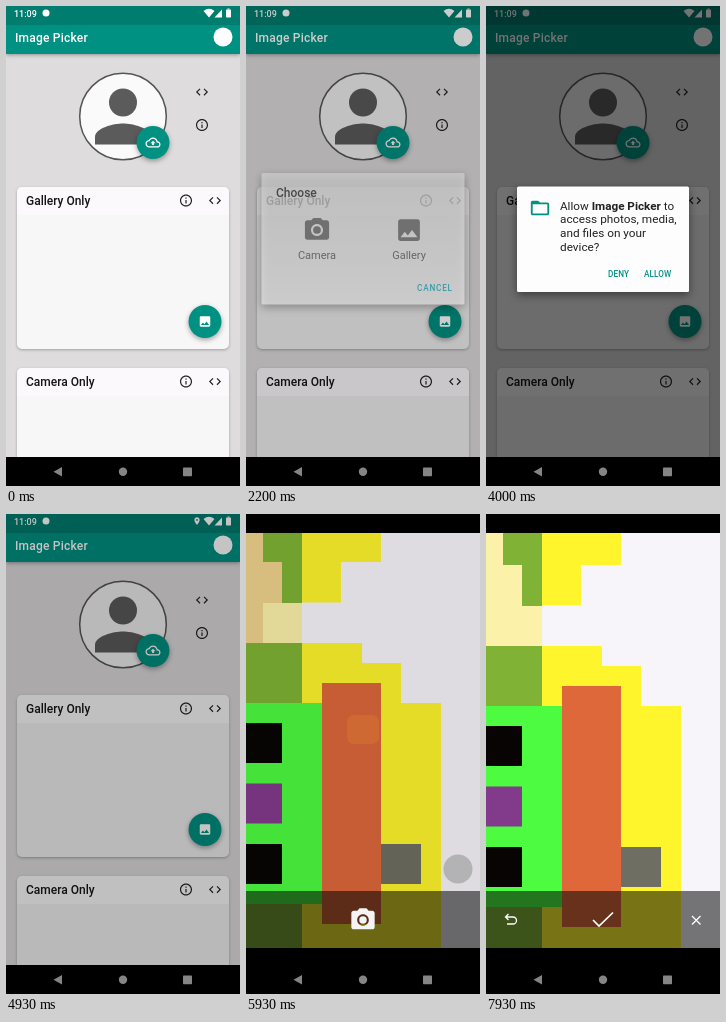
An HTML page with a canvas for the animation above (8000 ms loop, 234x480 px).

```html
<!DOCTYPE html>
<html lang="en">
<head>
<meta charset="utf-8">
<title>Image Picker</title>
<style>
html, body { margin: 0; width: 100%; height: 100%; overflow: hidden; background: #000; }
canvas { display: block; width: 234px; height: 480px; }
</style>
</head>
<body>
<canvas id="stage"></canvas>
<script>
const W = 234, H = 480, LOOP = 8000;
const canvas = document.getElementById('stage');
const ctx = canvas.getContext('2d');
const dpr = window.devicePixelRatio || 1;
canvas.width = W * dpr;
canvas.height = H * dpr;

const TEAL = '#009182';
const ICONS = {
  code: 'M9.4 16.6L4.8 12l4.6-4.6L8 6l-6 6 6 6 1.4-1.4zm5.2 0l4.6-4.6-4.6-4.6L16 6l6 6-6 6-1.4-1.4z',
  info: 'M11 7h2v2h-2zm0 4h2v6h-2zm1-9C6.48 2 2 6.48 2 12s4.48 10 10 10 10-4.48 10-10S17.52 2 12 2zm0 18c-4.41 0-8-3.59-8-8s3.59-8 8-8 8 3.59 8 8-3.59 8-8 8z',
  cloud: 'M19.35 10.04C18.67 6.59 15.64 4 12 4 9.11 4 6.6 5.64 5.35 8.04 2.34 8.36 0 10.91 0 14c0 3.31 2.69 6 6 6h13c2.76 0 5-2.24 5-5 0-2.64-2.05-4.78-4.65-4.96zM19 18H6c-2.21 0-4-1.79-4-4 0-2.05 1.53-3.76 3.56-3.97l1.07-.11.5-.95C8.08 7.14 9.94 6 12 6c2.62 0 4.88 1.86 5.39 4.43l.3 1.5 1.53.11c1.56.1 2.78 1.41 2.78 2.96 0 1.65-1.35 3-3 3zM8 13h2.55v3h2.9v-3H16l-4-4z',
  image: 'M21 19V5c0-1.1-.9-2-2-2H5c-1.1 0-2 .9-2 2v14c0 1.1.9 2 2 2h14c1.1 0 2-.9 2-2zM8.5 13.5l2.5 3.01L14.5 12l4.5 6H5l3.5-4.5z',
  camera: 'M15.2 12a3.2 3.2 0 1 1-6.4 0 3.2 3.2 0 0 1 6.4 0zM9 2L7.17 4H4c-1.1 0-2 .9-2 2v12c0 1.1.9 2 2 2h16c1.1 0 2-.9 2-2V6c0-1.1-.9-2-2-2h-3.17L15 2H9zm3 15c-2.76 0-5-2.24-5-5s2.24-5 5-5 5 2.24 5 5-2.24 5-5 5z',
  folder: 'M20 6h-8l-2-2H4c-1.1 0-2 .9-2 2v12c0 1.1.9 2 2 2h16c1.1 0 2-.9 2-2V8c0-1.1-.9-2-2-2zm0 12H4V8h16v10z',
  pin: 'M12 2C8.1 2 5 5.1 5 9c0 5.3 7 13 7 13s7-7.700 7-13c0-3.900-3.100-7-7-7zm0 9.500a2.500 2.500 0 1 1 0-5 2.500 2.500 0 0 1 0 5z'
};
const paths = {};
for (const name in ICONS) paths[name] = new Path2D(ICONS[name]);

const clamp = v => Math.min(1, Math.max(0, v));
const ramp = (t, a, b) => clamp((t - a) / (b - a));
const pulse = (t, a, b, c, d) => ramp(t, a, b) * (1 - ramp(t, c, d));

// Piecewise linear value through [time, value] pairs.
function track(t, keys) {
  for (let i = 1; i < keys.length; i++) {
    const [t0, v0] = keys[i - 1], [t1, v1] = keys[i];
    if (t < t1) return v0 + (v1 - v0) * ramp(t, t0, t1);
  }
  return keys[keys.length - 1][1];
}

function rect(x, y, w, h, color) {
  ctx.fillStyle = color;
  ctx.fillRect(x, y, w, h);
}

function box(x, y, w, h, r, color) {
  ctx.fillStyle = color;
  ctx.beginPath();
  ctx.roundRect(x, y, w, h, r);
  ctx.fill();
}

function disc(x, y, r, color) {
  ctx.fillStyle = color;
  ctx.beginPath();
  ctx.arc(x, y, r, 0, Math.PI * 2);
  ctx.fill();
}

function poly(points, color) {
  ctx.fillStyle = color;
  ctx.beginPath();
  points.forEach(([x, y]) => ctx.lineTo(x, y));
  ctx.fill();
}

function line(d, color, width) {
  ctx.strokeStyle = color;
  ctx.lineWidth = width;
  ctx.stroke(new Path2D(d));
}

function icon(name, x, y, size, color) {
  ctx.save();
  ctx.translate(x, y);
  ctx.scale(size / 24, size / 24);
  ctx.translate(-12, -12);
  ctx.fillStyle = color;
  ctx.fill(paths[name], 'evenodd');
  ctx.restore();
}

function text(str, x, y, size, color, weight = 400, align = 'left', spacing = 0) {
  ctx.font = `${weight} ${size}px Roboto, sans-serif`;
  ctx.letterSpacing = spacing + 'px';
  ctx.textAlign = align;
  ctx.fillStyle = color;
  ctx.fillText(str, x, y);
  return ctx.measureText(str).width;
}

// Real shadows are given in device pixels.
function withShadow(blur, dy, alpha, draw) {
  ctx.save();
  ctx.shadowColor = `rgba(0,0,0,${alpha})`;
  ctx.shadowBlur = blur * dpr;
  ctx.shadowOffsetY = dy * dpr;
  draw();
  ctx.restore();
}

function faded(alpha, draw) {
  if (alpha <= 0) return;
  ctx.save();
  ctx.globalAlpha = alpha;
  draw();
  ctx.restore();
}

function fab(x, y, name, size) {
  withShadow(5, 2, 0.35, () => disc(x, y, 16.5, TEAL));
  icon(name, x, y, size, '#fff');
}

function statusBar(t) {
  rect(0, 0, W, 19, '#007d6e');
  text('11:09', 8, 10.500, 9, '#fff', 500);
  disc(40, 7, 3.5, '#fff');
  if (t > 4900) icon('pin', 191, 7, 9, '#fff');
  ctx.fillStyle = '#fff';
  ctx.fill(new Path2D('M197.500 5Q203 0.500 208.500 5L203 11.500Z'));
  poly([[208.5, 11.5], [216, 11.5], [216, 3.5]], '#fff');
  box(220, 3.5, 5, 8, 0.7, '#fff');
  rect(221.5, 2.5, 2, 1, '#fff');
}

function navBar() {
  rect(0, 451, W, 29, '#000');
  poly([[47.5, 465.7], [56, 461], [56, 470.4]], '#858585');
  disc(117, 465.8, 4.2, '#858585');
  box(177, 461.5, 9, 8.8, 0.8, '#858585');
}

function card(y, title, body) {
  withShadow(3, 1, 0.28, () => box(11, y, 212, 162, 5, body));
  box(11, y, 212, 28, [5, 5, 0, 0], '#fbf9fb');
  text(title, 20, y + 18, 12, '#151515', 500);
  icon('info', 180, y + 13.5, 14.5, '#222');
  icon('code', 209, y + 13.5, 14.5, '#222');
}

function avatar(bg) {
  disc(117, 110.5, 43.3, bg);
  ctx.strokeStyle = '#555';
  ctx.lineWidth = 1.5;
  ctx.stroke();
  disc(117, 96.500, 14, '#5b5b5b');
  ctx.fill(new Path2D('M89 138.500V131C89 122 107.500 117.500 117 117.500S145 122 145 131V138.500Z'));
}

function home(t) {
  const early = t < 1670;
  rect(0, 0, W, 451, '#dedcdd');
  avatar(early ? '#fbfafb' : '#f2f1f2');
  icon('code', 196, 86, 14.5, '#222');
  icon('info', 196, 119, 14.5, '#222');
  fab(147, 136.5, 'cloud', 15);

  const body = early ? '#f8f7f8' : '#f0f0f0';
  card(181, 'Gallery Only', body);
  fab(199, 315.5, 'image', 14);
  card(362, 'Camera Only', body);

  withShadow(4, 1, 0.35, () => rect(0, 19, W, 29, TEAL));
  text('Image Picker', 9, 35.5, 12, '#fff', 500, 'left', 0.2);
  disc(217, 31, 9.5, '#fff');
  statusBar(t);
}

function chooser() {
  ctx.save();
  const fill = ctx.createLinearGradient(0, 167, 0, 298);
  fill.addColorStop(0, '#d0d0d0');
  fill.addColorStop(1, '#e4e4e4');
  ctx.globalAlpha *= 0.72;
  withShadow(8, 3, 0.4, () => box(15.5, 167, 203, 131.5, 1.5, fill));
  ctx.restore();
  text('Choose', 30, 190.5, 12, '#484848', 500);
  icon('camera', 71, 224, 29, '#707070');
  icon('image', 163, 224, 29, '#707070');
  text('Camera', 71, 253, 11, '#666', 400, 'center');
  text('Gallery', 163, 253, 11, '#666', 400, 'center');
  text('CANCEL', 171, 285, 8.2, '#3a9aa6', 500, 'left', 0.8);
}

function permission() {
  withShadow(9, 3, 0.45, () => box(31, 180.5, 172, 105.5, 1.5, '#fdfdfd'));
  icon('folder', 54, 202, 22, TEAL);
  const ink = '#222';
  let x = 74;
  x += text('Allow ', x, 203.5, 11.7, ink);
  x += text('Image Picker', x, 203.5, 11.7, ink, 700);
  text(' to', x, 203.5, 11.7, ink);
  ['access photos, media,', 'and files on your', 'device?'].forEach((s, i) =>
    text(s, 74, 217.4 + i * 13.8, 11.8, ink));
  text('DENY', 122, 270.5, 8.2, TEAL, 500, 'left', 0.1);
  text('ALLOW', 158, 270.5, 8.2, TEAL, 500, 'left', 0.1);
}

function scene() {
  const yellow = '#fff52c', olive = '#80b335';
  rect(0, 0, W, H, '#f7f5f9');
  rect(0, 0, 56, 132, '#fcf1a9');
  rect(17, 0, 39, 51, olive);
  rect(36, 51, 20, 41, olive);
  rect(0, 132, 56, 320, olive);
  rect(56, 0, 79, 51, yellow);
  rect(56, 51, 39, 40.5, yellow);
  rect(56, 132, 60, 20.5, yellow);
  rect(56, 152, 99, 40.5, yellow);
  rect(56, 192, 139, 260, yellow);
  rect(0, 192, 76, 201, '#4dfb40');
  rect(0, 212, 36, 40, '#080404');
  rect(0, 272.5, 36, 40, '#823a8b');
  rect(0, 333, 36, 40, '#080404');
  rect(76, 172, 59, 241, '#de683a');
  rect(135, 333, 40, 40, '#6e6e62');
}

function cameraApp(t) {
  const drift = track(t, [[5930, -3], [6900, 0]]);
  const cover = 1 - ramp(t, 5930, 6300);
  const review = ramp(t, 7000, 7150);
  rect(0, 0, W, 451, '#000');

  ctx.save();
  ctx.beginPath();
  ctx.rect(0, 19, W, 415);
  ctx.clip();
  faded(ramp(t, 5680, 5880), () => {
    ctx.save();
    ctx.translate(0, drift);
    scene();
    ctx.restore();
    faded(cover, () => {
      rect(0, 19, W, 415, 'rgba(0,0,0,.1)');
      rect(0, 19, 17, 110, 'rgba(190,120,60,.28)');
      rect(17, 48, 19, 41, 'rgba(190,120,60,.28)');
      box(101, 201, 32, 29, 7, 'rgba(220,125,50,.4)');
    });
    faded(1 - ramp(t, 6700, 6850), () => disc(212, 355, 14.5, 'rgba(135,135,137,.5)'));
  });
  rect(0, 377, W, 57, 'rgba(0,0,0,.53)');
  faded(1 - review, () => {
    icon('camera', 117, 406, 28, '#f5f3f3');
  });
  faded(review, () => {
    line('M19.500 403H27a3.500 3.500 0 0 1 0 7H21M22.500 400L19.500 403L22.500 406', '#fff', 1.3);
    line('M107 406L113 412L127 398.500', '#fff', 1.7);
    line('M206 402L214.500 410.500M214.500 402L206 410.500', '#fff', 1.3);
  });
  ctx.restore();
}

function touch(alpha, x, y) {
  faded(alpha, () => disc(x, y, 6, 'rgba(240,240,240,.65)'));
}

function draw(t) {
  ctx.setTransform(dpr, 0, 0, dpr, 0, 0);
  home(t);

  const dim = track(t, [[1750, 0], [2200, 0.2], [3000, 0.38], [3400, 0.45],
    [3700, 0.55], [4700, 0.55], [5100, 0]]);
  rect(0, 0, W, 451, `rgba(0,0,0,${dim})`);
  touch(pulse(t, 1670, 1700, 1750, 1850), 147, 136.5);
  faded(pulse(t, 1850, 2100, 3150, 3350), chooser);
  touch(pulse(t, 2860, 2930, 3080, 3180), 86, 226);
  faded(pulse(t, 3400, 3560, 4650, 4800), permission);
  touch(pulse(t, 4400, 4470, 4600, 4700), 172, 267);

  faded(ramp(t, 5580, 5700), () => cameraApp(t));
  navBar();
}

const start = performance.now();
function tick() {
  draw((performance.now() - start) % LOOP);
  requestAnimationFrame(tick);
}
tick();
</script>
</body>
</html>
```
